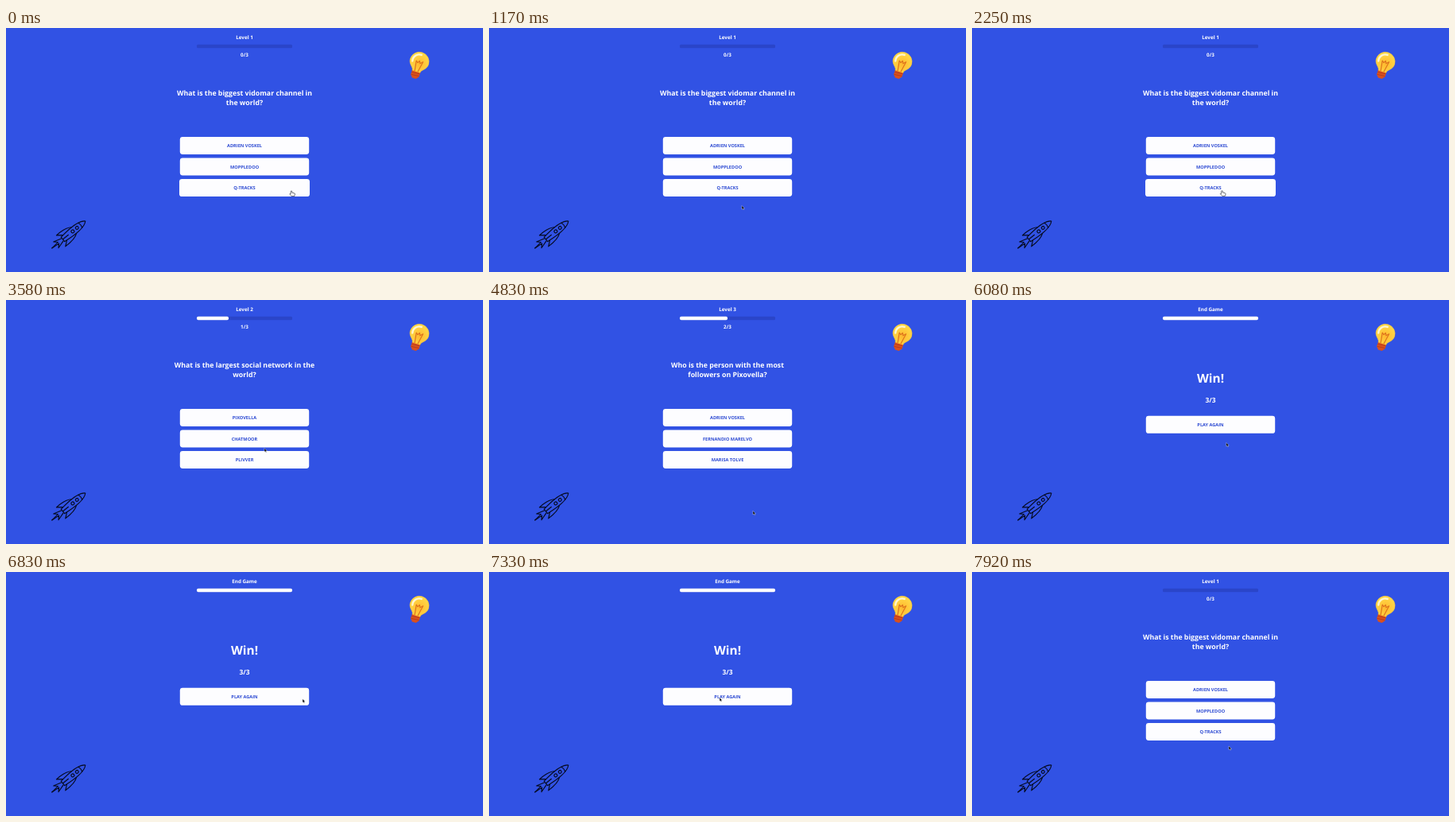
Animation of 600x307 px, one loop 8000 ms. Source, as an HTML page:

```html
<!DOCTYPE html>
<html lang="en">
<head>
<meta charset="utf-8">
<title>Quiz</title>
<style>
html, body { margin: 0; width: 100%; height: 100%; overflow: hidden; background: #3152e4; }
svg { display: block; width: 100%; height: 100%; }
text {
  font: 700 6.3px "Open Sans", "Noto Sans", sans-serif;
  fill: #fff; text-anchor: middle; text-rendering: geometricPrecision;
}
.ask { font-size: 8.78px; }
.win { font-size: 15.4px; }
.sum { font-size: 8.45px; }
.btn text { font-size: 5.62px; fill: #2f4cd3; }
.rocket { fill: none; stroke: #050a20; stroke-width: 1.15; stroke-linejoin: round; stroke-linecap: round; }
</style>
</head>
<body>
<svg viewBox="0 0 600 307">
  <defs>
    <rect id="plate" x="-81.2" y="-11" width="162.4" height="22" rx="3.4" fill="#fdfdff"/>
    <path id="fin" d="M7-5C2-9-4-9.5-14-9L-8-4.3M-12-2L-22-5L-18-1L-28.5 0"/>
    <radialGradient id="glow" cx=".55" cy=".6" r=".6">
      <stop offset="0" stop-color="#ffb82e"/>
      <stop offset="1" stop-color="#ffdc4a"/>
    </radialGradient>
  </defs>

  <text id="level" x="300" y="14.3"/>
  <rect x="240" y="20.8" width="120" height="4.4" rx="1.5" fill="#2a45c9"/>
  <rect id="bar" x="240" y="20.8" height="4.4" rx="1.8" fill="#fff"/>
  <text id="score" x="300" y="36.3"/>

  <g transform="translate(520 42.3) rotate(18)">
    <path d="M-5.4 12H5.4V18.5L2.5 22H-2.5L-5.4 18.5Z" fill="#d9501f"/>
    <path d="M-5 15.5L5 14.5M-5 18.5L5 17.5" stroke="#b23d18" stroke-width=".8"/>
    <path d="M-5 13C-5 9-12 7-12 0A12 12 0 0 1 12 0C12 7 5 9 5 13Z" fill="url(#glow)" stroke="#ffc93a" stroke-width=".6"/>
    <path d="M-8.5 2A8.5 8.5 0 0 1 0-8.8" fill="none" stroke="#fff6cf" stroke-width="2.4" stroke-linecap="round"/>
    <path d="M-2 13L-4 0L-1.5 2L0-1L1.5 2L4.5-1L2 13" fill="none" stroke="#dd741c" stroke-width="1.2" stroke-linejoin="round"/>
  </g>

  <g class="rocket" transform="translate(80 259) rotate(-39)">
    <path d="M25.5 0C20-5.5 8-6-11-3.5V3.5C8 6 20 5.5 25.5 0ZM17-4Q19 0 17 4M-10 0H-2"/>
    <circle cx="12" r="1.9"/>
    <circle cx="5" r="1.9"/>
    <use href="#fin"/>
    <use href="#fin" transform="scale(1 -1)"/>
  </g>

  <g id="quiz">
    <text class="ask" x="300" y="85.1"/>
    <text class="ask" x="300" y="97.1"/>
    <g class="btn"><use href="#plate"/><text y="2"/></g>
    <g class="btn"><use href="#plate"/><text y="2"/></g>
    <g class="btn"><use href="#plate"/><text y="2"/></g>
  </g>

  <g id="end">
    <text class="win" x="300" y="103.5">Win!</text>
    <text class="sum" x="300" y="129.2">3/3</text>
    <g class="btn" transform="translate(300 156.8)"><use href="#plate"/><text y="2">PLAY AGAIN</text></g>
  </g>

  <path id="arrow" d="M0 0V4.6L1.1 3.7L1.9 5.3L2.7 4.9L2 3.4H3.4Z" fill="#05070f" stroke="#fff" stroke-width=".35"/>
  <path id="hand" d="M-.8 3.6V.4Q0-.6.8.4V2.2L4 3Q4.6 3.3 4.4 4.6L3.8 6.6H.2L-2.2 3.9Q-1.8 2.9-.8 3.6Z" fill="#fff" stroke="#10131f" stroke-width=".6"/>
</svg>
<script>
const LOOP = 8000, END = 3;
const $ = id => document.getElementById(id);

const levels = [
  ["What is the biggest vidomar channel in", "the world?", "ADRIEN VOSKEL", "MOPPLEDOO", "Q-TRACKS"],
  ["What is the largest social network in the", "world?", "PIXOVELLA", "CHATMOOR", "PLIVVER"],
  ["Who is the person with the most", "followers on Pixovella?", "ADRIEN VOSKEL", "FERNANDIO MARELVO", "MARISA TOLVE"]
];
// each click moves on one screen; the last one starts over
const clicks = [2420, 4250, 6050, 7420];
// pointer stops: time, x, y
const stops = [
  [0, 359, 205], [1170, 318, 223.5], [1850, 314, 205], [3080, 316, 204], [3580, 325, 186.5],
  [4300, 322, 176], [4830, 332, 265.4], [5750, 319.5, 178.7], [6300, 320, 180],
  [6830, 373, 159.7], [7330, 290, 158], [7850, 323, 219], [LOOP, 323, 219]
];

function pointer(t) {
  const i = stops.findIndex(s => s[0] > t);
  const [t0, x0, y0] = stops[i - 1], [t1, x1, y1] = stops[i];
  const u = (t - t0) / (t1 - t0), k = u * u * (3 - 2 * u);
  return [x0 + (x1 - x0) * k, y0 + (y1 - y0) * k];
}

const screenAt = t => clicks.filter(c => c <= t).length % clicks.length;
const buttonY = i => 148 + 26.5 * i;

function over(i, t) {
  const [x, y] = pointer(t);
  return screenAt(t) !== END && Math.abs(x - 300) < 81 && Math.abs(y - buttonY(i)) < 11;
}

// averaging recent hover states eases the button's growth
function hover(i, t) {
  let n = 0;
  for (let k = 0; k < 8; k++) n += over(i, Math.max(0, t - k * 15));
  return n / 8;
}

const quizTexts = document.querySelectorAll("#quiz text");
const buttons = document.querySelectorAll("#quiz .btn");
const toggle = (id, on) => $(id).style.display = on ? "" : "none";

function show(n) {
  const end = n === END;
  $("level").textContent = end ? "End Game" : "Level " + (n + 1);
  $("score").textContent = end ? "" : n + "/3";
  $("bar").setAttribute("width", n && 120 / (4 - n));
  toggle("quiz", !end);
  toggle("end", end);
  if (!end) quizTexts.forEach((el, i) => el.textContent = levels[n][i]);
}

function draw(t) {
  show(screenAt(t));
  buttons.forEach((b, i) =>
    b.setAttribute("transform", `translate(300 ${buttonY(i)}) scale(${1 + 0.01 * hover(i, t)})`));
  const link = levels.some((_, i) => over(i, t));
  toggle("hand", link);
  toggle("arrow", !link);
  for (const id of ["hand", "arrow"]) $(id).setAttribute("transform", `translate(${pointer(t)})`);
}

const start = performance.now();
function tick() {
  draw((performance.now() - start) % LOOP);
  requestAnimationFrame(tick);
}
tick();
</script>
</body>
</html>
```
